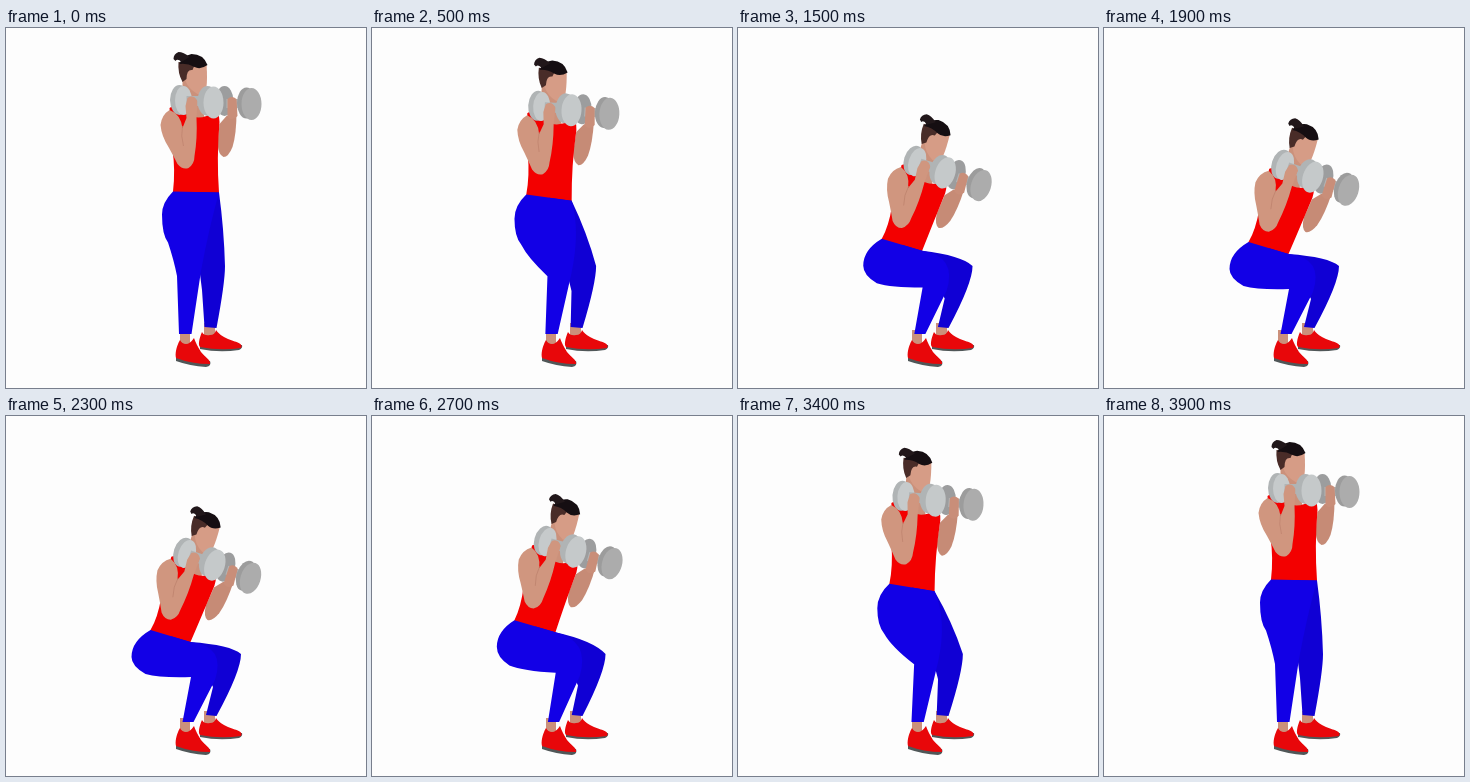
An HTML page for the animation above (4000 ms loop, 360x360 px).

```html
<!DOCTYPE html>
<html lang="en">
<head>
<meta charset="utf-8">
<title>Dumbbell squat</title>
<style>
html, body { margin: 0; width: 100%; height: 100%; overflow: hidden; background: #fdfdfd; }
svg { display: block; width: 100vw; height: 100vh; }
</style>
</head>
<body>
<svg viewBox="0 0 360 360">
  <g id="feet">
    <path fill="#cb907b" d="M198 295H209V309H198ZM174 302H184V317H174Z"/>
    <path fill="#505758" d="M194 317V321Q213 325 233 322Q237 320 236 317ZM170 328V333Q184 338 200 339Q206 338 204 333Z"/>
    <path fill="#e8070a" d="M196 304C193 311 192 317 194 319Q214 323 235 320C238 315 229 314 222 311Q213 307 210 302Q209 307 204 307Q198 308 196 304Z"/>
    <path fill="#e8070a" d="M174 312C170 319 169 326 170 330Q186 336 204 336C205 332 199 329 195 324Q190 316 188 310Q184 316 180 316Q176 316 174 312Z"/>
  </g>
  <g class="upper">
    <!-- far arm, far dumbbell and neck -->
    <path fill="#c68b76" d="M220 88L230 84Q230 106 226 119Q222 129 217 129Q212 127 211 116L213 96Z"/>
    <ellipse cx="218" cy="73" rx="9" ry="15" fill="#9c9d9e"/>
    <path fill="#b2b4b5" d="M220 71H238V80H220Z"/>
    <path fill="#c98e79" d="M221 71Q225 67 230 71L231 88Q226 94 221 89Z"/>
    <ellipse cx="240" cy="75" rx="9.500" ry="15.500" fill="#9c9c9c"/>
    <ellipse cx="245" cy="76" rx="10" ry="16" fill="#acacac"/>
    <path fill="#cb917b" d="M176 48L192 55L198 90L175 92L164 82Q175 74 176 60Z"/>
  </g>
  <path id="shirt" fill="#f30000"/>
  <g class="upper">
    <!-- head -->
    <path fill="#d69c86" d="M180 36H200Q201 50 200 59Q198 67 191 66Q182 61 179 53Z"/>
    <path fill="#492c28" d="M172 34L189 35L186 42Q180 41 180 51L176 54Q171 45 172 34Z"/>
    <path fill="#150e12" d="M173 36Q175 28 185 26Q197 26 201 37Q194 42 188 39Q181 35 173 36Z"/>
    <path fill="#21171a" d="M183 29Q177 24 172 24Q167 26 167 31L169 33Q171 30 175 34Z"/>
    <!-- near dumbbell and arm -->
    <ellipse cx="173" cy="72" rx="9.500" ry="15" fill="#b0b4b5"/>
    <ellipse cx="177" cy="72.500" rx="8.500" ry="14.500" fill="#c6cacb"/>
    <path fill="#b0b4b5" d="M180 68H200V78H180Z"/>
    <path fill="#d0967f" d="M163 82Q155 87 154 97Q155 108 162 119Q167 128 171 136Q176 142 182 140Q188 136 188 128Q191 110 190 90L191 73Q187 66 181 70L179 78L180 90L176 100Q174 86 163 82Z"/>
    <path fill="none" stroke="#bd826d" stroke-width=".7" d="M176 98Q174 108 177 118"/>
    <ellipse cx="201" cy="73" rx="10" ry="15" fill="#b0b4b5"/>
    <ellipse cx="207" cy="74.500" rx="10" ry="16" fill="#c5c9ca"/>
  </g>
  <path id="farLeg" fill="#1000d4"/>
  <path id="nearLeg" fill="#1200e6"/>
</svg>
<script>
const LOOP = 4000, STEP = 100;
const shirt = document.getElementById('shirt');
const nearLeg = document.getElementById('nearLeg');
const farLeg = document.getElementById('farLeg');
const uppers = document.querySelectorAll('.upper');

function ease(time, from, to) {
  const u = Math.min(1, Math.max(0, (time - from) / (to - from)));
  return u * u * (3 - 2 * u);
}

const add = ([x, y], dx, dy) => [x + dx, y + dy];

// depth runs from 0 (standing) to 1 (full squat)
function pose(depth) {
  const bend = Math.sqrt(depth);
  const back = 1 - (1 - depth) ** 6; // hips move back early
  const hipX = 190 - 25.5 * back - 3 * Math.sin(Math.PI * depth);
  const waist = [hipX, 164 + 56 * depth];
  const half = 23 - 3 * depth, tilt = 0.5 + 5.5 * back;
  const waistL = add(waist, -half, -tilt), waistR = add(waist, half, tilt);

  drawUpper([hipX + 0.5, 164 + 65 * depth], 18 * depth ** 0.75, waistL, waistR);
  drawNearLeg(depth, bend, waistL, waistR);
  drawFarLeg(depth, bend, waist, waistR);
}

function drawUpper([px, py], lean, waistL, waistR) {
  for (const g of uppers) {
    g.setAttribute('transform', `translate(${px} ${py}) rotate(${lean}) translate(-190 -164)`);
  }
  const c = Math.cos(lean * Math.PI / 180), s = Math.sin(lean * Math.PI / 180);
  const place = (x, y) => [
    px + (x - 190) * c - (y - 164) * s,
    py + (x - 190) * s + (y - 164) * c
  ];
  shirt.setAttribute('d', `M${place(163, 80)}Q${place(170, 75)} ${place(174, 77)}
    Q${place(184, 94)} ${place(200, 88)}L${place(207, 78)}Q${place(213, 84)} ${place(213, 94)}
    Q${place(210, 130)} ${waistR}l0 4L${add(waistL, 0, 4)}L${waistL}
    Q${place(169, 142)} ${place(166, 122)}Z`);
}

function drawNearLeg(depth, bend, waistL, waistR) {
  const seat = add(waistL, -11 - 8 * depth, 23 + 4 * bend);
  const under = add(waistL, -5, 51 - 7 * depth);
  const kneeBack = [171 + 14 * bend, 248 + 13 * depth ** 2];
  const kneeFront = [195 + 14 * bend, 243 + 21 * depth];
  nearLeg.setAttribute('d', `M${waistL}Q${seat[0]},${waistL[1] + 11} ${seat}
    Q${seat[0]},${under[1] - 8} ${under}
    Q${add(under, 6 + 9 * depth, 18 - 14 * bend)} ${kneeBack}
    L${173 + 3.5 * depth},306H${185.5 + 2 * depth}L${kneeFront}
    Q${203 + 17 * bend},${200 + 30 * depth} ${waistR}Z`);
}

function drawFarLeg(depth, bend, waist, waistR) {
  const knee = [219 + 16 * bend, 238];
  const thigh = [
    (waistR[0] + knee[0]) / 2 + 2 + 13 * depth,
    (waistR[1] + knee[1]) / 2 - 3 * depth
  ];
  farLeg.setAttribute('d', `M${waist}L${waistR}Q${thigh} ${knee}
    Q${add(knee, 0, 17)} 210.5,300L${198.5 + 1.5 * depth},299
    L${196 + 11 * bend},${262 + 9 * depth}L${193 + 2 * bend},${238 + 9 * depth}Z`);
}

const start = performance.now();
function tick() {
  const time = Math.floor((performance.now() - start) % LOOP / STEP) * STEP;
  pose(ease(time, 200, 1720) - ease(time, 2330, 3720));
  requestAnimationFrame(tick);
}
tick();
</script>
</body>
</html>
```
